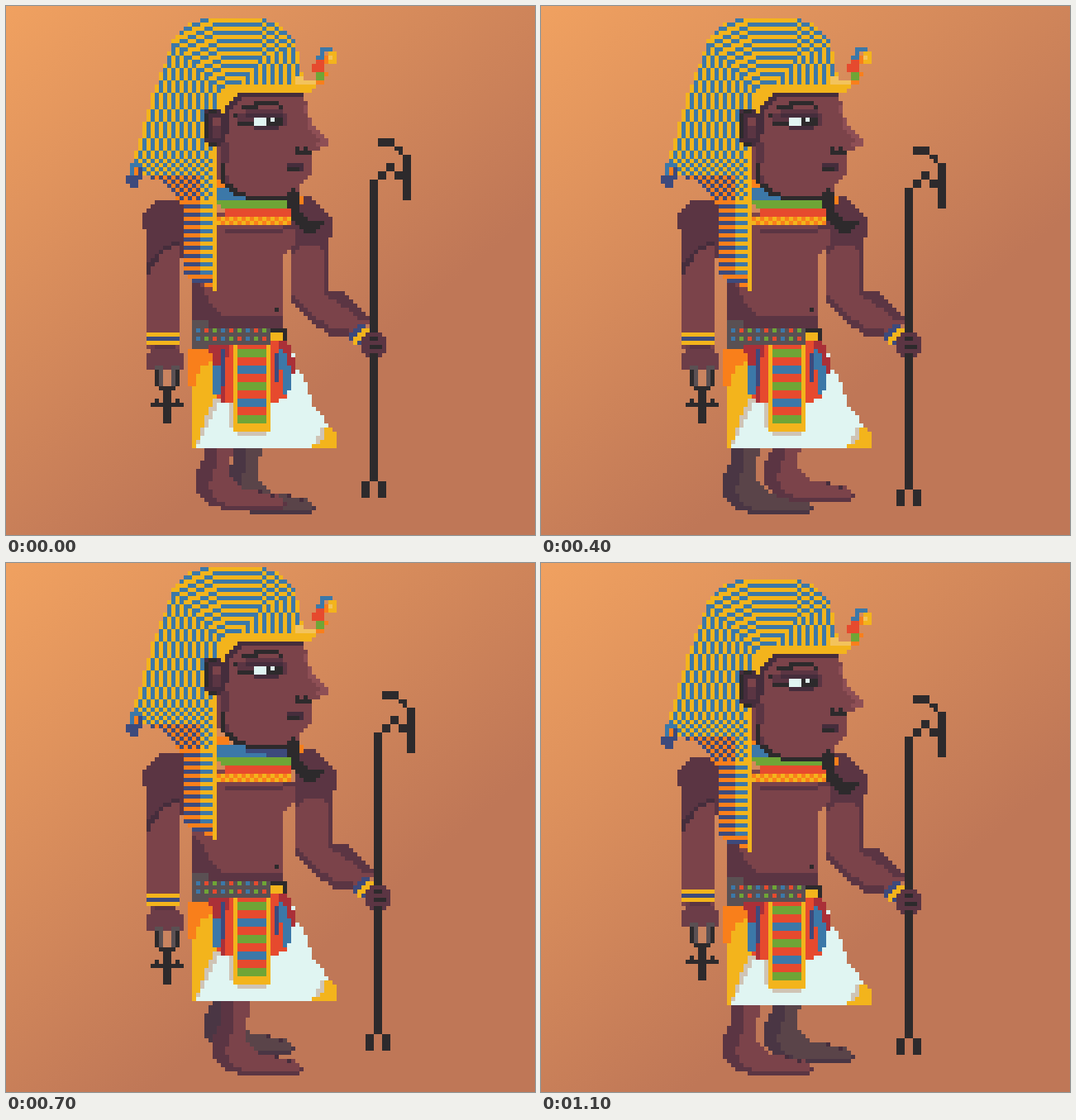
An HTML page with a canvas that plays this animation: 640 px wide and 640 px high, repeating every 1200 ms.

```html
<!DOCTYPE html>
<html lang="en">
<head>
<meta charset="utf-8">
<title>Walking pharaoh</title>
<style>
  html, body { margin: 0; width: 100%; height: 100%; overflow: hidden; }
  body { background: linear-gradient(140deg, #f0a160 0%, #bf7757 67%); }
  canvas { display: block; width: 640px; height: 640px; }
</style>
</head>
<body>
<canvas id="stage" width="640" height="640"></canvas>
<script>
const ctx = document.getElementById('stage').getContext('2d');
const CELL = 5, STEP = 100, STEPS = 12;

const C = {
  skin: '#7b434a', shade: '#5b3543', deep: '#452d3c', lit: '#8e4f55', black: '#2d2a2c',
  farSkin: '#5a4449', farShade: '#4a3644', hand: '#6c3d48',
  yellow: '#f3b41c', orange: '#f97f1b', blue: '#3c78a8', navy: '#3d4a7c', green: '#6fa536',
  red: '#e64a2e', wine: '#aa3038', white: '#e0f5f2', linen: '#cfc4b6', gray: '#5a5053', pale: '#f3c35c'
};

// Cosine that peaks at a given step; the stride lasts the whole loop, the bob half of it
const wave = (step, peak, period = STEPS) => Math.cos(2 * Math.PI * (step - peak) / period);
const headShift = step => Math.round(-0.7 + 1.7 * wave(step, 5, STEPS / 2));
const isRaised = step => wave(step, 2, STEPS / 2) > 0.4;
const heelAt = step => Math.round(49.1 + 5 * wave(step, 4.5));
const footLift = step => Math.max(0, Math.round(6 * wave(step, 2.5)));

function rect(color, x, y, w = 1, h = 1) {
  ctx.fillStyle = color;
  ctx.fillRect(x, y, w, h);
}

// Fills a polygon cell by cell; paint is a colour or (x, y) => colour
function poly(paint, ...pts) {
  const corners = [];
  for (let i = 0; i < pts.length; i += 2) corners.push([pts[i], pts[i + 1]]);
  const ys = corners.map(p => p[1]);
  for (let y = Math.floor(Math.min(...ys)); y < Math.max(...ys); y++) {
    const mid = y + 0.5;
    const hits = [];
    corners.forEach(([x1, y1], i) => {
      const [x2, y2] = corners[(i + 1) % corners.length];
      if ((y1 <= mid) !== (y2 <= mid)) hits.push(Math.round(x1 + (mid - y1) / (y2 - y1) * (x2 - x1)));
    });
    hits.sort((a, b) => a - b);
    for (let i = 0; i + 1 < hits.length; i += 2) {
      const [a, b] = [hits[i], hits[i + 1]];
      if (typeof paint === 'string') rect(paint, a, y, b - a);
      else for (let x = a; x < b; x++) rect(paint(x, y), x, y);
    }
  }
}

function shifted(dx, dy, draw) {
  ctx.save();
  ctx.translate(dx, dy);
  draw();
  ctx.restore();
}

function leg(step, ground, skin, shade) {
  const h = heelAt(step), b = ground - footLift(step);
  poly(shade, h + 2, 104, h + 9, 104, h + 8, b - 9, h + 9, b - 7, h + 12, b - 5, h + 19, b - 4, h + 22, b - 2,
    h + 20, b, h + 7, b, h + 4, b - 1, h + 1, b - 3, h, b - 5, h, b - 9, h + 2, b - 13);
  poly(skin, h + 5, 104, h + 9, 104, h + 8, b - 9, h + 9, b - 7, h + 12, b - 5, h + 19, b - 4, h + 22, b - 2,
    h + 20, b - 1, h + 8, b - 1, h + 4, b - 3, h + 3, b - 6, h + 5, b - 12);
  rect(C.deep, h + 15, b - 5);
  rect(C.deep, h + 18, b - 4);
}

function staff() {
  const bar = (...r) => rect(C.black, ...r);
  bar(88, 42, 2, 73);
  bar(86, 115, 2, 4);
  bar(90, 115, 2, 4);
  bar(90, 32, 4, 2);
  bar(94, 34, 2, 1);
  bar(95, 35, 1, 1);
  bar(96, 36, 2, 11);
  bar(92, 38, 2, 2);
  bar(90, 40, 2, 2);
  bar(94, 40, 2, 2);
}

function torso() {
  poly(C.skin, 47, 50, 69, 50, 70, 57, 67, 60, 67, 78, 45, 78, 45, 62);
  poly(C.shade, 45, 66, 48, 69, 50, 73, 53, 75, 67, 75, 67, 78, 45, 78);
  poly(C.skin, 48, 66, 67, 66, 67, 75, 53, 75, 50, 72);
  rect(C.shade, 53, 54, 14);
  rect(C.shade, 67, 53, 3);
  rect(C.black, 65, 73);
}

function collar() {
  rect(C.orange, 50, 42, 4, 2);
  rect(C.blue, 51, 44, 17, 3);
  poly(C.navy, 58, 45, 68, 45, 68, 47, 63, 47, 63, 46, 58, 46);
  poly(C.green, 51, 47, 69, 47, 69, 49, 52, 49);
  rect(C.red, 53, 49, 16, 2);
  poly((x, y) => (x + y) % 2 ? C.yellow : C.orange, 51, 51, 69, 51, 69, 53, 51, 53);
}

function leftArm(drop) {
  poly(C.shade, 37, 47 - drop, 44, 46, 44, 60, 34, 66, 34, 54, 33, 54, 33, 50);
  poly(C.skin, 38, 58, 42, 58, 42, 83, 34, 83, 34, 65);
  poly(C.deep, 41, 57, 42, 58, 38, 59, 35, 64, 34, 65, 34, 63, 37, 59);
  shifted(0, drop, () => {
    rect(C.skin, 34, 76, 8, 3);
    rect(C.yellow, 34, 79, 8, 3);
    rect(C.navy, 34, 80, 8, 1);
    poly(C.hand, 35, 82, 41, 82, 43, 85, 43, 88, 34, 88, 34, 85);
    rect(C.shade, 36, 82, 5, 1);
    rect(C.gray, 36, 87, 6, 5);
    rect('#c98460', 38, 88, 2, 4);
    rect(C.hand, 38, 87, 2, 1);
    rect(C.black, 36, 88, 1, 4);
    rect(C.black, 41, 88, 1, 4);
    rect(C.black, 37, 92, 4, 1);
    rect(C.black, 38, 93, 2, 8);
    rect(C.black, 35, 96, 8, 1);
    rect(C.black, 36, 95, 1, 1);
    rect(C.black, 41, 95, 1, 1);
  });
}

function rightArm() {
  poly(C.shade, 70, 46, 74, 46, 79, 52, 79, 56, 78, 56, 78, 69, 74, 74, 69, 58, 69, 50);
  poly(C.skin, 72, 58, 76, 58, 77, 61, 77, 69, 81, 70, 88, 77, 84, 80, 80, 80, 75, 77, 69, 71, 69, 60);
  poly(C.shade, 69, 70, 74, 75, 79, 78, 83, 78, 83, 80, 79, 80, 73, 76, 69, 72);
  poly(C.shade, 76, 69, 81, 69, 88, 76, 86, 76, 79, 71);
  poly((x, y) => (x + y) % 4 < 2 ? C.yellow : C.navy, 83, 79, 86, 77, 88, 78, 88, 79, 85, 82, 83, 81);
}

function fist() {
  poly(C.shade, 87, 79, 91, 79, 92, 81, 92, 83, 91, 85, 87, 85, 86, 83, 86, 81);
  rect(C.black, 88, 80, 2, 1);
  rect(C.black, 88, 82, 3, 1);
  rect(C.black, 88, 84, 2, 1);
}

function kilt() {
  poly(C.white, 45, 82, 69, 82, 70, 87, 72, 90, 75, 98, 77, 100, 80, 106, 80, 107, 45, 107);
  poly(C.linen, 50, 95, 52, 95, 50, 99, 47, 105, 46, 107, 45, 107);
  poly(C.yellow, 45, 84, 50, 84, 51, 94, 49, 98, 46, 106, 46, 107, 45, 107);
  poly(C.orange, 44, 83, 50, 82, 50, 86, 47, 87, 45, 93, 44, 92);
  poly(C.linen, 76, 102, 78, 102, 77, 105, 74, 106, 75, 105);
  poly(C.yellow, 77, 102, 79, 102, 80, 105, 80, 107, 74, 107, 74, 106, 77, 105);

  poly(C.red, 50, 81, 55, 81, 55, 96, 52, 96, 50, 94);
  poly(C.wine, 49, 81, 54, 81, 53, 88, 53, 96, 52, 96, 50, 88);
  rect(C.blue, 50, 87, 2, 7);
  rect(C.navy, 52, 83, 1, 9);
  poly(C.red, 64, 81, 67, 81, 68, 95, 64, 96);
  poly(C.wine, 66, 81, 68, 81, 70, 86, 70, 89, 68, 90);
  poly(C.blue, 66, 83, 67, 83, 69, 89, 69, 93, 67, 94);
  rect(C.navy, 65, 84, 1, 7);

  rect(C.linen, 54, 96, 1, 6);
  rect(C.linen, 56, 103, 7, 1);
  rect(C.yellow, 55, 81, 9, 22);
  rect(C.red, 56, 82, 7, 1);
  for (let i = 0; i < 9; i++) rect(i % 2 ? C.red : i % 4 ? C.blue : C.green, 56, 83 + 2 * i, 7, 2);

  poly(C.gray, 45, 76, 49, 76, 49, 78, 64, 78, 64, 82, 49, 82, 49, 83, 45, 83);
  const dots = [C.blue, C.red, C.green];
  for (let i = 0; i < 9; i++) {
    rect(dots[i % 3], 46 + 2 * i, 78);
    rect(dots[(2 * i) % 3], 46 + 2 * i, 80);
  }
  rect(C.shade, 50, 76, 17, 2);
  rect(C.black, 64, 78, 4, 3);
  rect(C.yellow, 64, 79, 3, 2);
}

// Stripes are nested arches parallel to the crown; lower they loosen into checks and bars
function clothColor(x, y) {
  const left = x - Math.round(y < 20 ? 42.6 - (y + 0.5) / 3 : 41.57 - (y + 0.5) / 3.5);
  let band;
  if (y < 20) {
    band = Math.floor(Math.min(
      y - 3,
      left,
      (x + 2 * y - 55) / 2.25,
      y - 3 - (x - 61) * 2 / 3,
      70 - x + (y - 9) / 5
    ));
  } else if (y < 37) band = left;
  else band = y < 47 ? x + y + 1 : y + 1;
  const shaded = y > 40 && x < 47 || y > 64;
  if (band & 1) return shaded ? C.navy : C.blue;
  return shaded ? C.orange : C.yellow;
}

function headdress() {
  poly(clothColor, 49, 3, 61, 3, 65, 4, 68, 6, 70, 9, 71, 14, 72, 19, 55, 20, 52, 25, 50, 28,
    51, 34, 51, 68, 49, 68, 44, 66, 43, 65, 43, 49, 41, 46, 37, 42, 33, 41, 31, 40,
    31, 37, 35.86, 20, 38, 15, 40, 9, 41, 7, 45, 4);
  rect(C.yellow, 50, 33, 1, 36);
  rect(C.blue, 30, 38, 2, 1);
  rect(C.orange, 31, 39, 1, 2);
  rect(C.blue, 30, 39, 1, 2);
  rect(C.navy, 32, 39, 1, 3);
  rect(C.navy, 29, 41, 3, 2);
  rect(C.navy, 30, 43, 2, 1);
}

function cobra() {
  rect(C.pale, 70, 17, 2, 2);
  rect(C.pale, 72, 18, 3, 1);
  rect(C.yellow, 72, 19, 3, 1);
  rect(C.orange, 75, 18, 2, 1);
  rect(C.green, 75, 16, 2, 2);
  rect(C.orange, 77, 16, 1, 1);
  rect(C.red, 74, 14, 3, 2);
  rect(C.red, 75, 13, 2, 1);
  rect(C.blue, 75, 12, 2, 1);
  rect(C.blue, 76, 10, 3, 1);
  rect(C.blue, 76, 11, 1, 1);
  rect(C.orange, 77, 12, 1, 2);
  rect(C.yellow, 78, 11, 2, 3);
  rect(C.pale, 78, 12, 1, 1);
}

function ear() {
  poly(C.deep, 48, 25, 51, 25, 53, 27, 54, 30, 53, 32, 51, 34, 49, 34, 48, 32);
  rect(C.black, 48, 26, 1, 6);
  rect(C.black, 49, 25, 2, 1);
  rect(C.black, 49, 33, 2, 1);
  rect(C.skin, 50, 27, 2, 2);
  rect(C.shade, 50, 29, 2, 3);
}

function face() {
  poly(C.skin, 56, 21, 72, 21, 73, 26, 74, 29, 77, 31, 78, 33, 77, 34, 74, 35, 74, 40, 73, 41,
    71, 43, 70, 46, 58, 46, 54, 44, 51, 42, 51, 26);
  poly(C.lit, 72, 23, 73, 26, 74, 29, 77, 31, 78, 33, 77, 34, 75, 34, 76, 32, 73, 30);
  rect(C.deep, 56, 21, 16, 1);
  poly(C.deep, 55, 22, 57, 22, 54, 26, 53, 29, 52, 29, 53, 25);
  rect(C.shade, 52, 33, 2, 5);
  rect(C.black, 52, 38, 1, 5);
  rect(C.black, 53, 43, 2, 1);
  rect(C.black, 54, 44, 2, 1);
  rect(C.black, 55, 45, 3, 1);
  rect(C.black, 58, 46, 11, 1);
  rect(C.shade, 53, 41, 1, 2);

  rect(C.black, 60, 23, 6, 1);
  rect(C.black, 57, 24, 4, 1);
  rect(C.black, 66, 24, 1, 1);
  rect(C.black, 55, 26, 3, 1);
  rect(C.shade, 58, 25, 9, 1);
  rect(C.shade, 56, 26, 12, 3);
  rect(C.deep, 58, 26, 9, 1);
  rect(C.deep, 60, 29, 6, 1);
  rect(C.black, 56, 28, 11, 1);
  rect(C.black, 60, 27, 7, 2);
  rect(C.white, 60, 27, 3, 2);
  rect(C.white, 64, 27, 1, 1);

  rect(C.black, 70, 35, 4, 1);
  rect(C.black, 70, 34);
  rect(C.black, 72, 34);
  rect(C.deep, 68, 38, 4, 2);
  rect(C.black, 68, 39, 3, 1);
}

function beard() {
  rect(C.orange, 71, 46, 1, 2);
  poly(C.black, 69, 44, 71, 45, 71, 49, 73, 52, 77, 52, 76, 54, 73, 55, 70, 53, 68, 48, 68, 45);
}

function head() {
  face();
  headdress();
  poly(C.yellow, 50, 28, 51, 24, 53, 20, 55, 19, 75, 19, 73, 21, 57, 21, 55, 22, 53, 25, 52, 26);
  ear();
  cobra();
  beard();
}

function drawStep(step) {
  const raised = isRaised(step) ? 1 : 0;
  const planted = step > 3 && step < 7;

  ctx.setTransform(CELL, 0, 0, CELL, 0, 0);
  ctx.clearRect(0, 0, 128, 128);
  leg((step + STEPS / 2) % STEPS, 123, C.farSkin, C.farShade);
  leg(step, 124, C.skin, C.shade);
  shifted(raised, -raised, rightArm);
  torso();
  leftArm(raised);
  collar();
  shifted(0, -raised, kilt);
  shifted(raised, planted ? 2 : -raised, staff);
  shifted(raised, -raised, fist);
  shifted(0, headShift(step), head);
}

const start = performance.now();
function tick() {
  drawStep(Math.floor((performance.now() - start) / STEP) % STEPS);
  requestAnimationFrame(tick);
}
tick();
</script>
</body>
</html>
```
